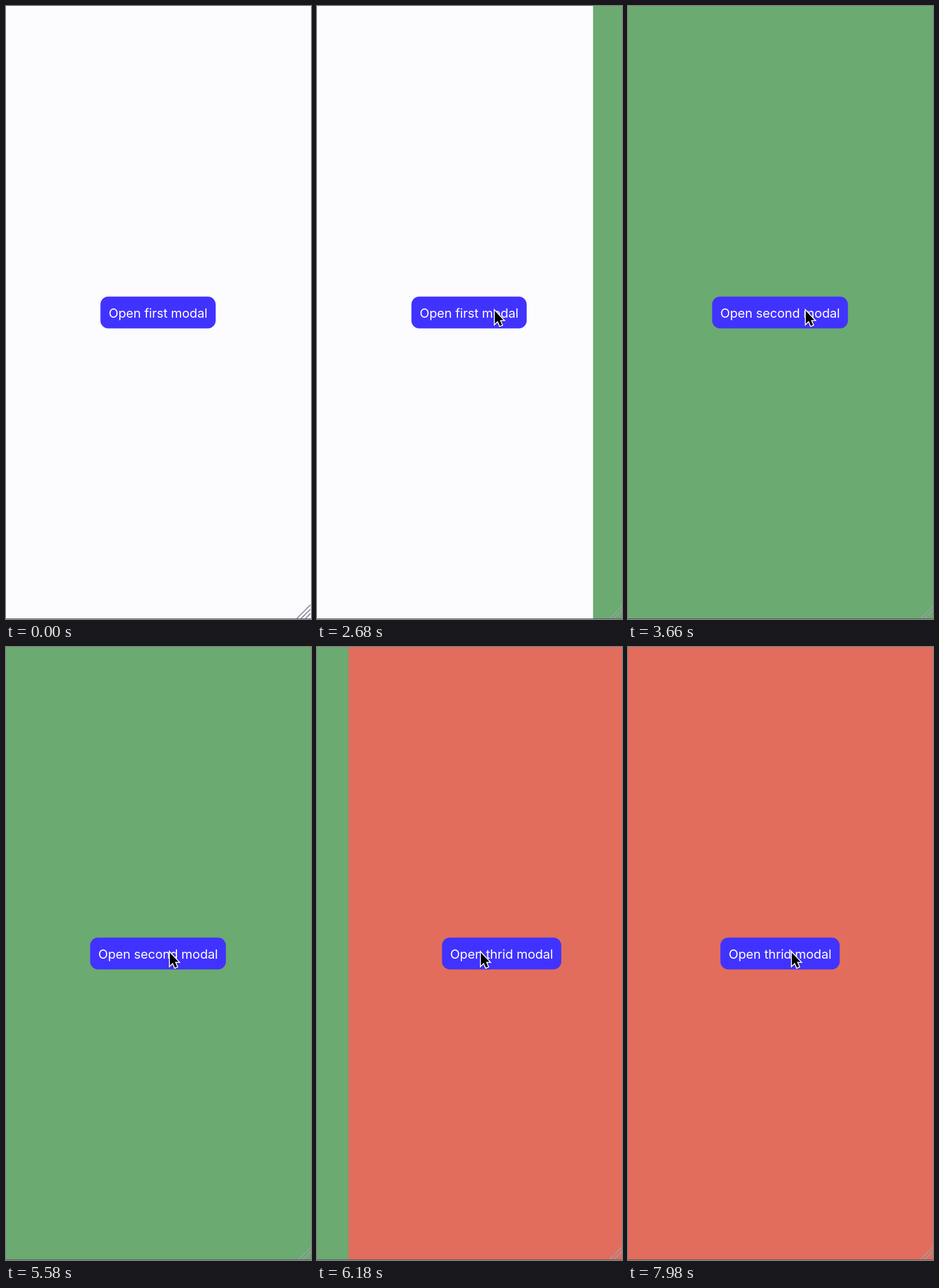
An HTML page for the animation above (8 s loop, 528 by 1060 pixels).

```html
<!DOCTYPE html>
<html lang="en">
<head>
<meta charset="utf-8">
<title>Stacked modals</title>
<style>
  html, body { margin: 0; width: 100%; height: 100%; overflow: hidden; background: #fcfcff; }
  svg { display: block; width: 528px; height: 1060px; }
  text { font: 22px Inter, "Open Sans", sans-serif; letter-spacing: -0.1px; fill: #fff; text-anchor: middle; }
</style>
</head>
<body>
<svg viewBox="0 0 528 1060">
  <rect width="528" height="1060" fill="#fcfcff"/>
  <g id="base"></g>
  <g id="green"></g>
  <g id="red"></g>
  <g fill="none">
    <path id="gripDark" d="M503.5 1059L527 1035.5M511 1059L527 1043M518.5 1059L527 1050.5" stroke="#8c8ca0" stroke-width="1.8"/>
    <path id="gripLight" d="M506.5 1059L528 1037.5M514 1059L528 1045" stroke="#9ca2a8" stroke-width="1.5"/>
  </g>
  <rect y="1059" width="528" height="1" fill="#55555f"/>
  <path id="cursor" d="M0 0V22.6L5.1 17.6L8.9 26.2L12.6 24.6L8.9 16.2H15.2Z"
    fill="#000" stroke="#fff" stroke-width="3.2" paint-order="stroke"
    style="filter: drop-shadow(0 1px 1px rgba(0,0,0,.25))"/>
</svg>
<script>
const LOOP = 8000, W = 528, REST = -1.7, MID = 263.2;
const el = id => document.getElementById(id);

function button(label, width) {
  return `<rect x="${MID - width / 2}" y="502.6" width="${width}" height="54.9" rx="13.5" fill="#4133ff"/>
    <text x="${MID}" y="539">${label}</text>`;
}

function panel(id, color, label, width) {
  el(id).innerHTML = `<rect x="${REST}" width="${W + 4}" height="1060" fill="${color}"/>` + button(label, width);
}

el('base').innerHTML = button('Open first modal', 199.5);
panel('green', '#6baa70', 'Open second modal', 235);
panel('red', '#e26d5c', 'Open thrid modal', 206.5);

const clamp = u => Math.max(0, Math.min(1, u));
const span = (n, start, length) => clamp((n - start) / length);
const mix = (a, b, u) => a + (b - a) * u;
const sineOut = u => Math.sin(u * Math.PI / 2);
const smooth = u => u * u * (3 - 2 * u);

function tick(ms) {
  const t = ms + 20;
  return 3 * Math.floor(t / 140) + Math.min(2, Math.floor(t % 140 / 20)) - 1;
}

function slide(id, n, start) {
  const u = sineOut(span(n, start, 19.9));
  el(id).setAttribute('transform', `translate(${mix(W - REST, 0, u)} 0)`);
  el(id).style.display = u > 0 ? '' : 'none';
  return u;
}

function draw(ms) {
  const n = tick(ms);
  const opened = slide('green', n, 56.8) > 0;
  slide('red', n, 119);
  el('gripDark').style.display = opened ? 'none' : '';
  el('gripLight').style.display = opened ? '' : 'none';

  const enter = 1 - Math.pow(1 - span(n, 10, 28), 2.4);
  const nudge = smooth(span(n, 86, 18));
  const x = mix(502, 307.7, enter) - 24.1 * nudge;
  const y = mix(762, 527, enter) + 1.4 * nudge;
  el('cursor').setAttribute('transform', `translate(${x} ${y})`);
  el('cursor').style.display = n < 10 ? 'none' : '';
}

const began = performance.now();
function loop() {
  draw((performance.now() - began) % LOOP);
  requestAnimationFrame(loop);
}
loop();
</script>
</body>
</html>
```
